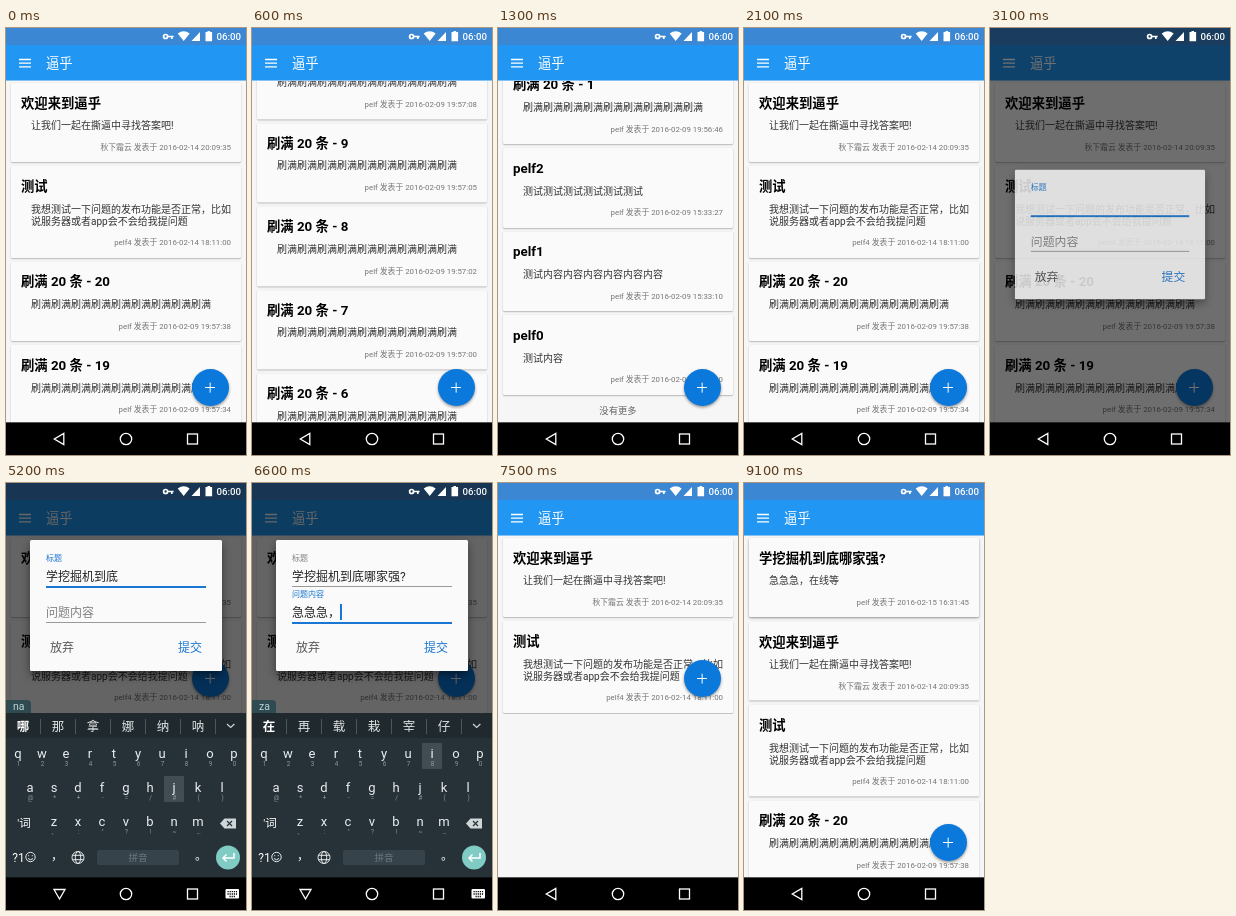
Recreate the animation shown at these times as an HTML page. Size 240 by 427 pixels, loop 9.4 s.

```html
<!DOCTYPE html>
<html lang="zh-CN">
<head>
<meta charset="utf-8">
<title>逼乎</title>
<style>
html, body { margin: 0; width: 100%; height: 100%; overflow: hidden; background: #000; }
body { position: relative; font-family: Roboto, "Noto Sans CJK SC", "Noto Sans CJK", sans-serif; }
#stage { position: absolute; left: 0; top: 0; width: 240px; height: 427px; overflow: hidden; background: #f6f6f6; }
#stage > *, #dialog > *, #kb > * { position: absolute; }
svg { left: 0; top: 0; overflow: visible; }
#list, #shift, #fresh, #scrim, #dialog, #kb, #fab, #view { animation: 9.4s infinite both; }

#bar { left: 0; top: 0; width: 240px; height: 53px; background: linear-gradient(#3c87d4 17.5px, #2196f3 17.5px 52px, #84c1f4 52px); }
#bar svg { position: absolute; }
#bar b { position: absolute; left: 40px; top: 26px; font: 400 13.33px/20px Roboto, "Noto Sans CJK SC", sans-serif; color: #fff; }

#view { left: 0; top: 53px; width: 240px; height: 342px; overflow: hidden; animation-name: view; animation-timing-function: step-end; }
#list { position: relative; padding-top: 2px; animation-name: scroll; }
#shift { animation-name: shift; }
#fresh { position: absolute; left: 0; top: 2px; width: 240px; animation-name: fresh; }
.card { margin: 0 5px 4px; padding: 12.6px 10px 9.4px; border-radius: 1.3px; background: #fafafa; box-shadow: 0 .7px 1.5px rgba(0,0,0,.32); }
#fresh .card { box-shadow: 0 1px 2.5px rgba(0,0,0,.42); }
.card h2 { margin: 0; font-size: 13.33px; line-height: 16px; font-weight: 700; color: #000; white-space: nowrap; }
.card p { margin: 8.8px 0 11px 10px; font-size: 10px; line-height: 11.7px; color: #333; white-space: nowrap; }
.card div { font-size: 7.85px; line-height: 10px; color: #757575; text-align: right; white-space: nowrap; }
#end { height: 28px; margin-top: -2px; font-size: 9.33px; line-height: 28px; text-align: center; color: #666; }

#fab { left: 186px; top: 340.5px; width: 37px; height: 37px; border-radius: 50%; background: #0b78dc; box-shadow: 0 1.5px 3px rgba(0,0,0,.4); animation-name: fab; animation-timing-function: step-end; }
#fab::before, #fab::after { content: ""; position: absolute; left: 13.3px; top: 18.2px; width: 10px; height: 1.3px; background: #fff; }
#fab::after { transform: rotate(90deg); }

#scrim { left: 0; top: 0; width: 240px; height: 395px; background: rgba(0,0,0,.6); animation-name: fadeScrim; }

#dialog { left: 24px; top: 57px; width: 192px; height: 131px; border-radius: 1.5px; background: #fafafa; box-shadow: 0 4px 9px rgba(0,0,0,.45); animation-name: dialog; }
#dialog span { white-space: nowrap; font-size: 12px; line-height: 16px; color: #222; }
#dialog .small { font-size: 8px; font-weight: 500; }
#dialog .blue { color: #1976d2; }
#dialog .grey { color: #808080; }
.rule { left: 16px; width: 160px; height: 1px; background: #9a9a9a; }
.rule.on { height: 1.5px; background: #1976d2; }
#caret { width: 1.4px; height: 16px; background: #1976d2; }

#kb { left: 0; top: 230px; width: 240px; height: 165px; background: #263238; animation-name: kb; }
#comp { left: 0; top: -13px; height: 13px; padding: 0 6px 0 7px; border-radius: 0 4px 0 0; background: #304a51; font-size: 10.5px; line-height: 13px; color: #b9d3d7; }
#strip { left: 0; top: 0; width: 240px; height: 25px; background: #20292d; }
#cands { left: 0; top: 0; display: flex; }
#cands i { box-sizing: border-box; width: 35px; height: 15px; margin: 5.500px 0; border-right: .7px solid #4a575d; font: 400 12.5px/15px Roboto, "Noto Sans CJK SC", sans-serif; text-align: center; color: #dfe4e6; }
#cands i:first-child { font-weight: 700; color: #fff; }
#press { width: 20px; height: 26px; border-radius: 1px; background: #414d53; }
#nav { left: 0; top: 394px; width: 240px; height: 32px; border-top: 1px solid rgba(0,0,0,.65); background: #000 padding-box; }
[hidden] { display: none !important; }

@keyframes scroll {
  0%, 1.06% { transform: none; animation-timing-function: cubic-bezier(.35,0,.45,1); }
  12.23%, 15.43% { transform: translateY(-1783px); animation-timing-function: cubic-bezier(.35,0,.45,1); }
  21.81%, 100% { transform: none; }
}
@keyframes view { 0% { height: 342px; } 36.17% { height: 178px; } 80.85%, 100% { height: 342px; } }
@keyframes fab { 0% { transform: none; } 36.17% { transform: translateY(-164px); } 80.85%, 100% { transform: none; } }
@keyframes fadeScrim { 0%, 30.85% { opacity: 0; } 34.04%, 75.53% { opacity: 1; } 78.19%, 100% { opacity: 0; } }
@keyframes dialog {
  0%, 31.91% { opacity: 0; transform: translateY(84px) scale(.95); }
  34.04%, 35.64% { opacity: 1; transform: translateY(84px); }
  39.36% { transform: translateY(3px); }
  40.96%, 75.53% { opacity: 1; transform: none; }
  77.66%, 100% { opacity: 0; transform: none; }
}
@keyframes kb {
  0%, 35.64% { opacity: 0; transform: translateY(60px); }
  39.36% { opacity: .85; transform: translateY(10px); }
  40.96%, 75.53% { opacity: 1; transform: none; }
  78.72%, 100% { opacity: 0; transform: translateY(60px); }
}
@keyframes shift { 0%, 91.49% { transform: none; } 94.15%, 100% { transform: translateY(83.5px); } }
@keyframes fresh { 0%, 94.15% { opacity: 0; } 96.81%, 100% { opacity: 1; } }
</style>
</head>
<body>
<div id="stage">
  <div id="view"><div id="list"><div id="fresh"></div><div id="shift"></div></div></div>
  <div id="bar">
    <svg width="240" height="53"><path d="M13 31.500h12M13 35.200h12M13 38.900h12" stroke="#fff" stroke-width="1.3"/></svg>
    <b>逼乎</b>
  </div>
  <div id="fab"></div>
  <div id="scrim"></div>

  <svg width="240" height="18" fill="#fff">
    <g fill="none" stroke="#fff" stroke-width="1.7"><circle cx="159.6" cy="8.5" r="2"/><path d="M161.300 8.5h6.3M165.800 8.5v2.6"/></g>
    <path d="M171.7 5.6Q177.7 1 183.7 5.6L177.7 13zM185.5 13l8.5-9v9zM199.5 4h2v-1h2.6v1h2v9.2h-6.6z"/>
    <text x="235" y="12.2" font-size="9.7" font-weight="500" text-anchor="end">06:00</text>
  </svg>

  <div id="dialog">
    <span class="small" id="label1" style="left:16px;top:11px">标题</span>
    <span id="title" style="left:16px;top:29px"></span>
    <div class="rule" id="rule1" style="top:46px"></div>
    <span class="grey" id="hint" style="left:16px">问题内容</span>
    <span id="content" style="left:16px;top:65px"></span>
    <div class="rule" id="rule2" style="top:82px"></div>
    <div id="caret"></div>
    <span style="left:20px;top:100px;color:#555">放弃</span>
    <span class="blue" style="left:148px;top:100px;font-weight:500">提交</span>
  </div>

  <div id="kb">
    <div id="strip"></div>
    <div id="press"></div>
    <svg id="keys" width="240" height="165" fill="#fff"></svg>
    <div id="comp"></div>
    <div id="cands"></div>
  </div>

  <div id="nav">
    <svg width="240" height="32" fill="none" stroke="#fff" stroke-width="1.3">
      <path id="back" d="M57.800 10.5v11L48.3 16z"/>
      <path id="down" d="M48 11.5h11L53.5 21z"/>
      <circle cx="120" cy="16" r="5.7"/>
      <rect x="181.5" y="11" width="10" height="10"/>
      <g id="ime" stroke="none">
        <rect x="219.5" y="11" width="13.5" height="9.5" rx="1" fill="#fff"/>
        <path d="M221.5 13.7h9.8M221.5 16h9.8M223.5 18.5h6" stroke="#000" stroke-dasharray="1.2 .9"/>
      </g>
    </svg>
  </div>
</div>

<script>
const $ = id => document.getElementById(id);
const LOOP = 9400;

// Feed
const card = (title, body, who, when) =>
  `<div class="card"><h2>${title}</h2><p>${body}</p><div>${who} 发表于 2016-02-${when}</div></div>`;
const two = n => String(n).padStart(2, '0');
const user = 'pelf';

let feed = card('欢迎来到逼乎', '让我们一起在撕逼中寻找答案吧!', '秋下霜云', '14 20:09:35') +
  card('测试', '我想测试一下问题的发布功能是否正常，比如<br>说服务器或者app会不会给我提问题', user + '4', '14 18:11:00');
for (let i = 20; i > 0; i--) {
  const s = 46 + Math.floor(1.867 * (i - 1) ** 1.13);
  feed += card(`刷满 20 条 - ${i}`, '刷满'.repeat(9), user, `09 19:${56 + Math.floor(s / 60)}:${two(s % 60)}`);
}
feed += card(user + '2', '测试'.repeat(6), user, '09 15:33:27') +
  card(user + '1', '测试' + '内容'.repeat(6), user, '09 15:33:10') +
  card(user + '0', '测试内容', user, '09 15:32:50');
$('shift').innerHTML = feed + '<div id="end">没有更多</div>';
$('fresh').innerHTML = card('学挖掘机到底哪家强?', '急急急，在线等', user, '15 16:31:45');

// Keyboard
const spots = {};
const text = (x, y, size, s, fill = '#fff') =>
  `<text x="${x}" y="${y}" font-size="${size}" fill="${fill}" text-anchor="middle">${s}</text>`;
const rows = [
  ['qwertyuiop', '1234567890', 12, 45],
  ['asdfghjkl', '@*+-=/#()', 24, 78.5],
  ['zxcvbnm', '、:"?!~…', 48, 112.5]
];
let keys = '';
for (const [letters, subs, x0, y] of rows) {
  [...letters].forEach((c, i) => {
    const x = x0 + 24 * i;
    spots[c] = [x, y];
    keys += text(x, y, 13, c, '#eceff1') + text(x + .5, y + 8.3, 6.3, subs[i], '#8b979c');
  });
}
keys += `
  <g id="idle">
    ${text(25, 17.5, 15, '中')}<path d="M33 18v-3l3 3z"/>${text(75, 17, 13.5, 'En')}
    <path d="M218.5 9.5h8l-4 5z" fill="none" stroke="#cfd6d9"/>
    <path d="M18 103l7.5 7.5h-4.5v5h-6v-5h-4.5z" fill="#c5ccd0"/>
    <circle cx="222" cy="144.5" r="12" fill="#80cbc4"/>
    <path d="M215.5 144.5h9.5m-3.5-3.5l3.5 3.5-3.5 3.5M227.5 140.5v8" fill="none" stroke="#fff" stroke-width="1.4"/>
  </g>
  <g id="busy">
    ${text(18, 114, 11.5, "'词")}
    <path d="M221 11l3.7 3.5 3.7-3.5" fill="none" stroke="#cfd6d9" stroke-width="1.2"/>
    <circle cx="222" cy="144.5" r="12" fill="#80cbc4"/>
    <path d="M228 140v5h-11m3.5-3.5l-3.5 3.5 3.5 3.5" fill="none" stroke="#fff" stroke-width="1.5"/>
  </g>
  <path d="M214 110.5l4.5-5h11.5v10h-11.5z" fill="#cfd6d9"/>
  <path d="M221 108l5 5m0-5l-5 5" stroke="#263238" stroke-width="1.2"/>
  ${text(12.5, 148.5, 12, '?1')}
  <g fill="none" stroke="#e6eaec">
    <circle cx="24.5" cy="144" r="4.7"/><path d="M22 145.5q2.5 2.5 5 0M22.7 142.2v1M26.3 142.2v1"/>
    <circle cx="72" cy="144.5" r="6"/><ellipse cx="72" cy="144.5" rx="2.7" ry="6"/><path d="M66.5 142.3h11M66.5 146.7h11"/>
  </g>
  ${text(51, 147, 12, '，')}${text(195, 147, 12, '。')}
  <rect x="91" y="137" width="82" height="15" rx="2" fill="#36434a"/>
  ${text(132, 148, 9.5, '拼音', '#6c787d')}`;
$('keys').innerHTML = keys;

// Typing: start, ms per letter, letters, committed text, candidates, field
const phrases = [
  [4020, 55, 'xuewajueji', '学挖掘机', '学雪血穴薛削', 0],
  [4680, 60, 'daodi', '到底', '到道倒导刀岛', 0],
  [5080, 55, 'najiaqiang', '哪家强', '哪那拿娜纳呐', 0],
  [5720, 40, '', '?', '', 0],
  [6060, 50, 'jijiji', '急急急', '急及级机集极', 1],
  [6440, 40, '', '，', '', 1],
  [6500, 36, 'zaixiandeng', '在线等', '在再载栽宰仔', 1]
];
const FOCUS = 5800, FLOAT = 150;

function draw(t) {
  const typed = ['', ''];
  let comp = '', cands = '', next = '';
  for (const [from, step, letters, out, list, field] of phrases) {
    const n = Math.floor((t - from) / step);
    if (n > letters.length) typed[field] += out;
    else if (n >= 0) {
      comp = letters.slice(0, n);
      next = letters[n] || '';
      cands = list;
    }
  }
  $('title').textContent = typed[0];
  $('content').textContent = typed[1];
  $('comp').textContent = comp;
  $('comp').hidden = $('cands').hidden = !comp;
  $('cands').innerHTML = [...cands].map(c => `<i>${c}</i>`).join('');
  $('idle').style.display = comp ? 'none' : '';
  $('busy').style.display = comp ? '' : 'none';

  $('press').hidden = !next;
  if (next) {
    const [x, y] = spots[next];
    $('press').style.left = x - 10 + 'px';
    $('press').style.top = y - 15.5 + 'px';
  }

  const second = t >= FOCUS;
  const up = Math.min(1, Math.max(0, (t - FOCUS) / FLOAT));
  $('label1').className = 'small ' + (second ? 'grey' : 'blue');
  $('hint').className = second ? 'blue' : 'grey';
  $('hint').style.fontSize = 12 - 4 * up + 'px';
  $('hint').style.top = 65 - 18 * up + 'px';
  $('rule1').className = second ? 'rule' : 'rule on';
  $('rule2').className = second ? 'rule on' : 'rule';

  const field = $(second ? 'content' : 'title');
  $('caret').hidden = Math.floor(t / 500) % 2 === 0;
  $('caret').style.left = 16.3 + field.offsetWidth + 'px';
  $('caret').style.top = second ? '64px' : '28px';

  const ime = t >= 3400 && t < 7200;
  $('back').style.display = ime ? 'none' : '';
  $('down').style.display = $('ime').style.display = ime ? '' : 'none';
}

let start;
function tick(now) {
  start ??= now;
  draw((now - start) % LOOP);
  requestAnimationFrame(tick);
}
draw(0);
requestAnimationFrame(tick);
</script>
</body>
</html>
```
